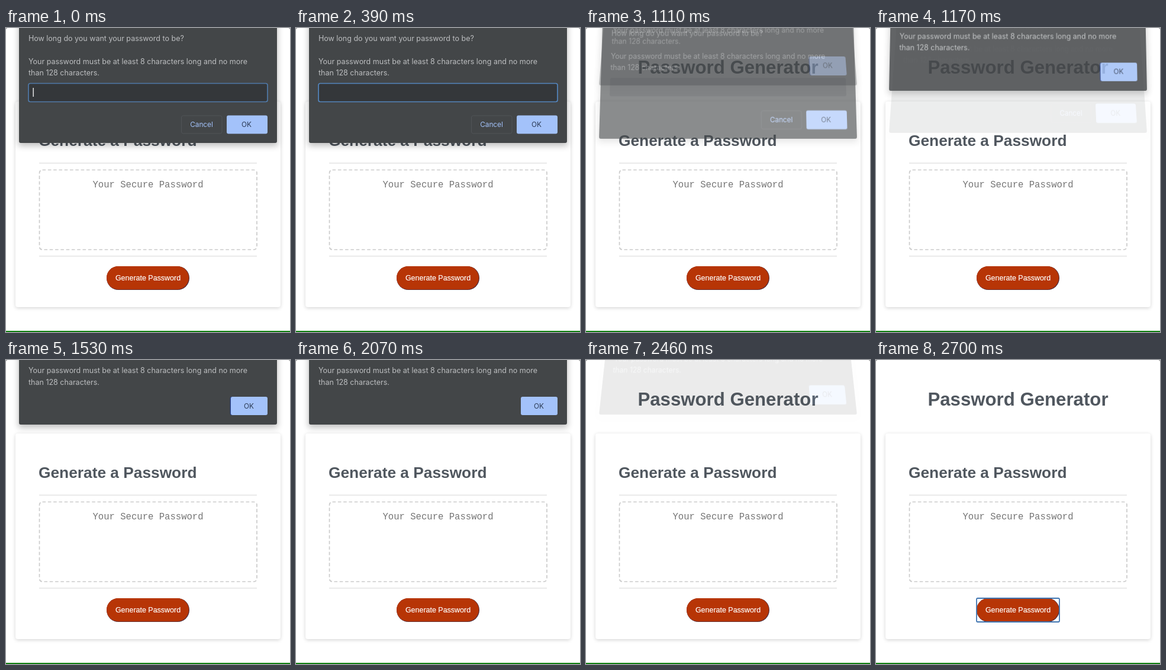
These frames come from a looping animation (480 by 513 pixels, 2760 ms). An HTML page:

```html
<!DOCTYPE html>
<html lang="en">
<head>
<meta charset="utf-8">
<title>Password Generator</title>
<style>
  html, body { margin: 0; width: 100%; height: 100%; overflow: hidden; background: #777; }
  #stage { position: relative; width: 480px; height: 513px; overflow: hidden; background: #fff; border-radius: 3px 3px 0 0; }
  svg { position: absolute; left: 0; top: 0; overflow: visible; }
  .page { font-family: "Liberation Sans", Arial, sans-serif; }
  .head { font-weight: bold; fill: #50575f; }
  .dialog { font-family: Inter, sans-serif; font-size: 12.5px; fill: #bbbdbf; }
  .body { fill: #434648; }
  .shade { fill: #000; opacity: .25; filter: url(#blur); }
  .ok { fill: #a3c2fa; }
  .label { font-size: 11.8px; text-anchor: middle; fill: #2b3a55; }
</style>
</head>
<body>
<div id="stage">
  <svg class="page" width="480" height="513">
    <defs>
      <filter id="blur" x="-10%" y="-10%" width="120%" height="125%"><feGaussianBlur stdDeviation="5.5"/></filter>
      <filter id="soft" x="-5%" y="-5%" width="110%" height="110%"><feGaussianBlur stdDeviation="3"/></filter>
    </defs>
    <text class="head" x="240" y="77" font-size="31.2" text-anchor="middle">Password Generator</text>
    <rect x="16" y="125.500" width="448" height="347" rx="4" fill="#000" opacity=".17" filter="url(#soft)"/>
    <rect x="16" y="124" width="448" height="347" rx="4" fill="#fff"/>
    <text class="head" x="55" y="199" font-size="26.3">Generate a Password</text>
    <path d="M56 228H424M56 385H424" stroke="#e4e4e4" stroke-width="1.3"/>
    <rect x="56.500" y="239.500" width="367.500" height="134.500" rx="5" fill="none" stroke="#cbcbcb" stroke-width="1.7" stroke-dasharray="5.6 3.7"/>
    <text x="240" y="269" font-size="15.6" text-anchor="middle" fill="#757575" style="font-family:'Liberation Mono','Courier New',monospace">Your Secure Password</text>
    <rect x="170" y="402" width="140" height="40" rx="20" fill="#4c2a3c"/>
    <rect x="170" y="402" width="139" height="39.200" rx="19.600" fill="#b73506"/>
    <text x="240" y="426" font-size="12.48" text-anchor="middle" fill="#fff" stroke="#fff" stroke-width=".2">Generate Password</text>
    <rect id="focus" x="170" y="402" width="140" height="40" rx="2" fill="none" stroke="#3f74b0" stroke-width="1.8"/>
    <rect y="511" width="480" height="2" fill="#128012"/>
  </svg>

  <svg class="dialog" id="prompt" width="480" height="513">
    <rect class="shade" x="21" y="-40" width="438" height="239"/>
    <rect class="body" x="22" y="-60" width="436" height="254" rx="3"/>
    <text x="38" y="22">How long do you want your password to be?</text>
    <text x="38" y="61">Your password must be at least 8 characters long and no more</text>
    <text x="38" y="80">than 128 characters.</text>
    <rect x="38" y="93" width="404" height="31" rx="3" fill="#34373a"/>
    <rect id="ring" x="38" y="93.500" width="404" height="31" rx="3" fill="none" stroke="#5589c4" stroke-width="1.7"/>
    <rect id="caret" x="45.500" y="101" width="1.300" height="15" fill="#fff"/>
    <rect x="296.500" y="148" width="68.500" height="30" rx="3" fill="none" stroke="#505457"/>
    <text class="label" x="330.500" y="167" style="fill:#a3c2fa">Cancel</text>
    <rect class="ok" x="373" y="147.500" width="69" height="31" rx="3"/>
    <text class="label" x="406.500" y="167">OK</text>
  </svg>

  <svg class="dialog" id="alert" width="480" height="513">
    <rect class="shade" x="21" y="-40" width="438" height="154"/>
    <rect class="body" x="22" y="-60" width="436" height="169" rx="3"/>
    <text x="38" y="22">Your password must be at least 8 characters long and no more</text>
    <text x="38" y="41.500">than 128 characters.</text>
    <rect id="edge" x="378.700" y="62" width="20" height="31" rx="3" fill="#243f8c"/>
    <rect class="ok" x="380" y="62" width="62" height="31" rx="3"/>
    <text class="label" x="410.500" y="81.500">OK</text>
  </svg>
</div>
<script>
  const LOOP = 2760, STEP = 30, HIDE_MS = 115;
  const PROMPT_OUT = 1067, ALERT_IN = 1080, ALERT_OUT = 2358;
  const $ = id => document.getElementById(id);
  const clamp = v => Math.max(0, Math.min(1, v));
  const show = (id, on) => $(id).style.display = on ? '' : 'none';

  // Tilts a dialog back around its bottom edge; v = 0 flat, 1 gone.
  function warp(id, bottom, height, v, alpha) {
    const el = $(id);
    show(id, alpha > 0);
    el.style.opacity = alpha;
    el.style.transformOrigin = `240px ${bottom}px`;
    const lift = 19 * v, k = 0.09 * v / height, sy = 1 + 0.09 * v + lift * k;
    el.style.transform = v
      ? `matrix3d(1,0,0,0, 0,${sy},0,${-k}, 0,0,1,0, 0,${-lift},0,1)`
      : 'none';
    el.querySelector('.shade').style.opacity = 0.25 * (1 - v);
  }

  function draw(t) {
    const out = clamp((t - PROMPT_OUT) / HIDE_MS);
    warp('prompt', 194, 234, out, 1 - out);
    show('ring', !out);
    $('ring').style.opacity = 0.8 + 0.2 * clamp(t / 500);
    show('caret', !out && (t < 270 || t >= 770));

    const p = clamp((t - ALERT_IN) / 150);
    const rise = 1 - (1 - p) * (1 - p);
    const gone = clamp((t - ALERT_OUT) / HIDE_MS);
    warp('alert', 109, 149, gone || 1 - rise, rise * (1 - gone));
    show('edge', t < 1650);
    show('focus', t >= 2490);
  }

  let start;
  function tick(now) {
    start ??= now;
    draw(Math.floor((now - start) % LOOP / STEP) * STEP);
    requestAnimationFrame(tick);
  }
  draw(0);
  requestAnimationFrame(tick);
</script>
</body>
</html>
```
